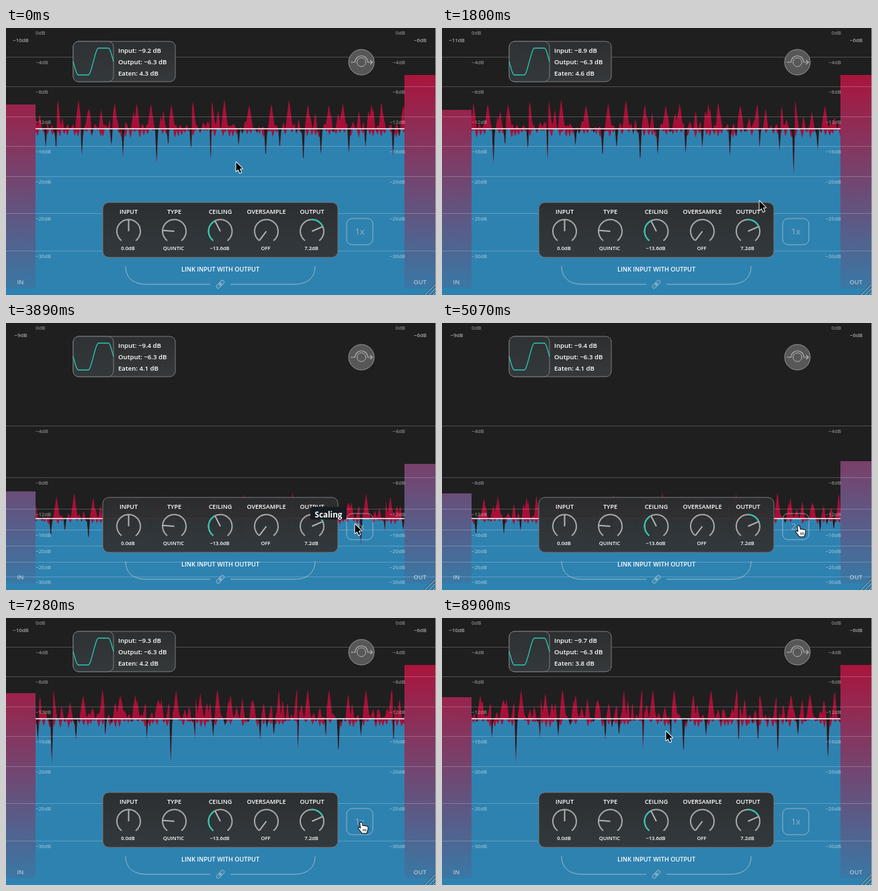
Write an HTML page with a canvas that moves like this. It is 640 by 398 pixels and loops after 9.05 s.

```html
<!DOCTYPE html>
<html lang="en">
<head>
<meta charset="utf-8">
<title>Clipper plugin</title>
<style>
html, body { margin: 0; width: 100%; height: 100%; overflow: hidden; background: #1f1f1f; }
canvas { display: block; }
</style>
</head>
<body>
<canvas id="stage" width="640" height="398"></canvas>
<script>
const ctx = document.getElementById('stage').getContext('2d');
const W = 640, H = 398, LOOP = 9050, TICKS = 61;
const LEFT = 44, RIGHT = 593, CEILING = 13.6, SCROLL = 12.3;
const BG = '#1f1f1f', BLUE = '#2e82b0', RED = '#a80f37', TEAL = '#2bc8ae', GRAY = '#a9a9a9';
const FONT = '"Open Sans", "Noto Sans", sans-serif';

// [tick, input peak, input meter] in dB
const LEVELS = [[0, -9.2, 10.36], [12, -8.9, 11.08], [19, -8.9, 11.35], [26, -9.4, 9.6], [49, -9.3, 10.18], [60, -9.7, 10.72]];
// [tick, x, y]
const POINTER = [[0, 342, 199], [12, 472, 257], [16, 519, 299], [28, 519, 299], [33, 531, 302], [53, 528, 305], [60, 333, 168]];

function track(keys, t) {
  let i = 0;
  while (i < keys.length - 2 && t >= keys[i + 1][0]) i++;
  const a = keys[i], b = keys[i + 1];
  const k = (t - a[0]) / (b[0] - a[0]);
  return a.slice(1).map((v, j) => v + (b[j + 1] - v) * k);
}

function hash(n) {
  const s = Math.sin(n * 127.1 + 11.7) * 43758.5453;
  return s - Math.floor(s);
}

// Vertical scales: linear in dB, or stretched near 0 dB
const narrowY = db => db * 11.1 - 1;
const wideY = db => 462.8 * db / (db + 8.02) + 14 * (db / 30) ** 3.5 - 1;

// Triangular spikes, one at a random place in every cell
function spikes(x, cell, half, seed, height) {
  const here = Math.floor(x / cell);
  let top = 0;
  for (let c = here - 1; c <= here + 1; c++) {
    const id = c + seed * 1000;
    const center = (c + 0.2 + 0.6 * hash(id)) * cell;
    top = Math.max(top, height(hash(id + 0.5)) * (1 - Math.abs(x - center) / half));
  }
  return top;
}

const toDb = y => (y + 1) / 11.1;

function signalAt(x) {
  const rise = Math.max(
    spikes(x, 29, 5.5, 1, h => 36 + 10 * h),
    spikes(x, 8, 4, 2, h => 6 + 27 * h * h));
  const deep = spikes(x, 33, 2.3, 3, h => 28 + 46 * h * h);
  const shallow = spikes(x, 7, 2.6, 4, h => 17 * h * h);
  return toDb(deep > rise ? 150 + deep : 150 - rise + shallow);
}

const signal = Array.from({ length: 1400 }, (_, x) => signalAt(x));
const output = signal.map((v, x) =>
  Math.max(CEILING, v, toDb(150 + spikes(x, 5.5, 3, 5, h => 15 * h))));

function text(str, x, y, size, color = '#fff', align = 'left', weight = 600) {
  ctx.font = `${weight} ${size}px ${FONT}`;
  ctx.textAlign = align;
  ctx.textBaseline = 'alphabetic';
  ctx.fillStyle = color;
  ctx.fillText(str.replace('-', '\u2212'), x, y + size * 0.36);
}

function line(color, width, ...pts) {
  ctx.beginPath();
  pts.forEach(([x, y]) => ctx.lineTo(x, y));
  ctx.strokeStyle = color;
  ctx.lineWidth = width;
  ctx.stroke();
}

function circle(x, y, r, fill, stroke) {
  ctx.beginPath();
  ctx.arc(x, y, r, 0, 2 * Math.PI);
  paint(fill, stroke);
}

function box(x, y, w, h, r, fill, stroke) {
  ctx.beginPath();
  ctx.roundRect(x, y, w, h, r);
  paint(fill, stroke);
}

function paint(fill, stroke, width = 1) {
  if (fill) { ctx.fillStyle = fill; ctx.fill(); }
  if (stroke) { ctx.strokeStyle = stroke; ctx.lineWidth = width; ctx.stroke(); }
}

function shade(y0, y1, from, to) {
  const g = ctx.createLinearGradient(0, y0, 0, y1);
  g.addColorStop(0, from);
  g.addColorStop(1, to);
  return g;
}

function area(data, color, shift, toY) {
  const first = Math.floor(LEFT + shift), last = Math.ceil(RIGHT + shift);
  ctx.beginPath();
  ctx.moveTo(first - shift, H);
  for (let x = first; x <= last; x++) ctx.lineTo(x - shift, toY(data[x]));
  ctx.lineTo(last - shift, H);
  paint(color);
}

function drawWave(tick, toY) {
  ctx.save();
  ctx.beginPath();
  ctx.rect(LEFT, 0, RIGHT - LEFT, H);
  ctx.clip();
  area(signal, RED, tick * SCROLL, toY);
  area(output, BLUE, tick * SCROLL, toY);
  const y = toY(CEILING) + 0.4;
  line('#fff', 1.5, [LEFT, y], [RIGHT, y]);
  ctx.restore();
}

function drawMeters(inDb, outDb, toY) {
  const bars = [[0, LEFT, inDb], [RIGHT, W - RIGHT, outDb]];
  for (const [x, w, db] of bars) {
    const top = Math.round(toY(db));
    ctx.fillStyle = BLUE;
    ctx.fillRect(x, top, w, H - top);
    ctx.fillStyle = shade(30, 420, '#b8082f', BLUE);
    ctx.fillRect(x, top, w, 388 - top);
  }
}

function drawScale(toY) {
  const dim = 'rgba(255,255,255,.46)';
  for (const db of [0, 4, 8, 12, 16, 20, 25, 30]) {
    const y = Math.floor(toY(db) + 0.15), label = (db ? '-' : '') + db + 'dB';
    line('rgba(255,255,255,.22)', 1, [0, y + 0.5], [W, y + 0.5]);
    text(label, 44, y + 8, 7.7, dim);
    text(label, 594, y + 8, 7.7, dim, 'right');
  }
}

// Quintic soft clipping of a sine
function drawCurve() {
  ctx.beginPath();
  for (let x = 0; x <= 60; x++) {
    const v = Math.max(-1.25, Math.min(1.25, 1.75 * Math.sin(x * Math.PI / 30)));
    ctx.lineTo(100 + x, 50 + 20 * (v - 256 / 3125 * v ** 5));
  }
  paint(null, TEAL, 1.3);
}

function drawInfo(peak) {
  const edge = '#7c7e7f';
  box(100, 20, 152, 60, 8, shade(20, 80, '#2c2e2f', '#36393b'), edge);
  box(100, 20, 60, 60, 8, shade(20, 80, '#2e3234', '#33383c'), edge);
  drawCurve();
  const rounded = Math.round(peak * 10) / 10;
  text(`Input: ${rounded.toFixed(1)} dB`, 167, 33.5, 9.6);
  text('Output: -6.3 dB', 167, 50.5, 9.6);
  text(`Eaten: ${(13.5 + rounded).toFixed(1)} dB`, 167, 67.5, 9.6);
}

function drawBypass() {
  const color = '#b5b5b5';
  circle(529, 51, 19, '#575757', '#999');
  circle(529, 51, 6.5, null, color);
  ctx.beginPath();
  ctx.moveTo(513, 51);
  ctx.arc(529, 51, 9.5, Math.PI, 0);
  ctx.lineTo(545, 51);
  paint(null, color, 1.2);
  line(color, 1.2, [542, 48], [545.5, 51], [542, 54]);
}

function drawKnob(x, name, value, angle, from) {
  const y = 303, rad = a => (a - 90) * Math.PI / 180;
  const arc = (a, b, color) => {
    ctx.beginPath();
    ctx.arc(x, y, 17.5, rad(a), rad(b));
    paint(null, color, 2);
  };
  arc(-143, 143, GRAY);
  if (from !== undefined) arc(from, angle, TEAL);
  const c = Math.cos(rad(angle)), s = Math.sin(rad(angle));
  line('#b4b4b4', 2, [x, y], [x + 17 * c, y + 17 * s]);
  text(name, x, 273.5, 9, '#fff', 'center');
  text(value, x - 1, 328, 7.6, '#fff', 'center');
}

function drawPanel() {
  box(144, 260, 350, 82, 9, shade(260, 342, 'rgba(44,44,45,.97)', 'rgba(50,55,58,.97)'), '#777b7e');
  drawKnob(182.5, 'INPUT', '0.0dB', 0);
  drawKnob(250.5, 'TYPE', 'QUINTIC', -86);
  drawKnob(319, 'CEILING', '-13.6dB', -27, -143);
  drawKnob(387.5, 'OVERSAMPLE', 'OFF', -143);
  drawKnob(455.5, 'OUTPUT', '7.2dB', 66, 0);
}

function drawLink() {
  const color = 'rgba(205,215,220,.65)';
  text('LINK INPUT WITH OUTPUT', 319, 359.5, 9.2, '#fff', 'center');
  for (const side of [-1, 1]) {
    ctx.save();
    ctx.translate(319, 355);
    ctx.scale(side, 1);
    ctx.beginPath();
    ctx.moveTo(141, 0);
    ctx.bezierCurveTo(141, 17, 130, 27, 110, 27);
    ctx.lineTo(15, 27);
    paint(null, color);
    ctx.restore();
  }
  ctx.save();
  ctx.translate(319, 382);
  ctx.rotate(-Math.PI / 4);
  box(-7, -2.5, 7.5, 5, 2, null, color);
  box(-0.5, -2.5, 7.5, 5, 2, null, color);
  line(color, 1, [-3.5, 0], [3.5, 0]);
  ctx.restore();
}

function drawEdges() {
  for (let d = 5; d <= 17; d += 6) {
    line('rgba(20,25,30,.7)', 1, [W - d - 1, H], [W, H - d - 1]);
    line('rgba(225,230,235,.75)', 1, [W - d, H], [W, H - d]);
  }
  ctx.fillStyle = '#a5a5a5';
  ctx.fillRect(639, 0, 1, H);
}

function outline(fill, stroke, pts) {
  ctx.beginPath();
  pts.forEach(([x, y]) => ctx.lineTo(x, y));
  ctx.closePath();
  ctx.lineJoin = 'round';
  paint(null, stroke, 2);
  paint(fill);
}

function drawPointer(x, y, hand) {
  ctx.save();
  ctx.translate(x, y);
  if (hand) {
    outline('#fff', '#000', [[-1.5, 1], [0, 0], [1.3, 1], [2, 5.5], [5, 5.5], [9.5, 6.7],
      [10, 9], [8, 16], [1.5, 16], [-4, 9], [-3, 7.8], [-0.5, 9.5]]);
    for (let i = 3; i <= 7; i += 2) line('#000', 0.8, [i, 10], [i, 13.5]);
  } else {
    outline('#000', '#fff', [[0.5, 1], [0.5, 14.5], [3.6, 11.7], [6, 17], [8.2, 16], [5.8, 10.8], [10, 10.6]]);
  }
  ctx.restore();
}

function draw(tick) {
  const [peak, inDb] = track(LEVELS, tick);
  const outDb = 6.4 + 0.3 * Math.exp(-(((tick - 26) / 8) ** 2));
  const [px, py] = track(POINTER, tick);
  const wide = tick >= 22 && tick < 47;
  const toY = wide ? wideY : narrowY;

  ctx.fillStyle = BG;
  ctx.fillRect(0, 0, W, H);
  drawWave(tick, toY);
  drawMeters(inDb, outDb, toY);
  drawScale(toY);

  const soft = 'rgba(255,255,255,.6)';
  text(`-${Math.floor(inDb)}dB`, 22, 18, 7.9, soft, 'center');
  text('-6dB', 616.5, 18, 7.9, soft, 'center');
  text('IN', 21.5, 378.5, 9.1, soft, 'center');
  text('OUT', 616, 378.5, 9.1, soft, 'center');

  drawInfo(peak);
  drawBypass();
  drawPanel();
  box(507, 284, 39, 39, 8, null, 'rgba(215,215,215,.6)');
  text(wide ? '2x' : '1x', 526.5, 303.5, 13, 'rgba(205,205,205,.65)', 'center', 400);
  drawLink();
  drawEdges();
  if (tick >= 17 && tick < 31) {
    box(453, 274, 54, 19, 3, '#161c21');
    text('Scaling', 480, 285.5, 11.7, '#fff', 'center', 700);
  }
  drawPointer(px, py, tick >= 32 && tick < 54);
}

const start = performance.now();
function frame() {
  const ms = (performance.now() - start) % LOOP;
  draw(Math.min(TICKS - 1, Math.floor(ms / LOOP * TICKS + 0.02)));
  requestAnimationFrame(frame);
}
frame();
</script>
</body>
</html>
```
